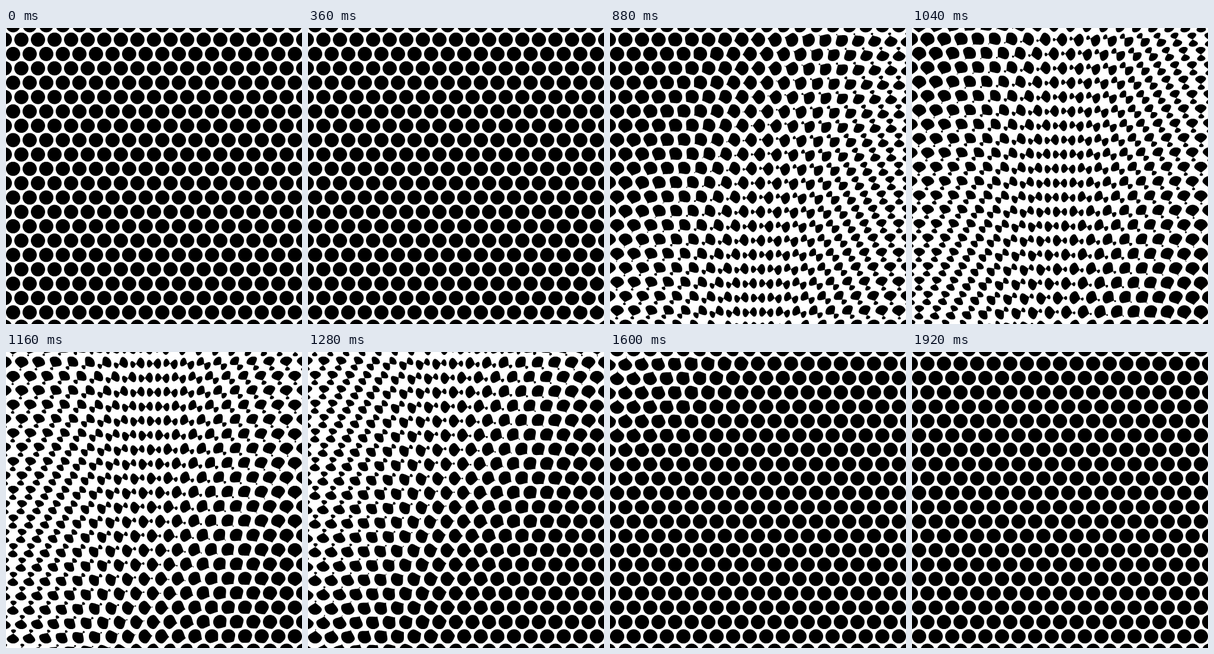
These frames come from a looping animation (500x500 px, 1.96 s). An HTML page with a canvas:

```html
<!DOCTYPE html>
<html lang="en">
<head>
<meta charset="utf-8">
<title>Twisting dots</title>
<style>
  html, body { margin: 0; width: 100%; height: 100%; overflow: hidden; background: #fff; }
  canvas { display: block; width: 500px; height: 500px; }
</style>
</head>
<body>
<canvas id="stage" width="500" height="500"></canvas>
<script>
const SIZE = 500, MID = SIZE / 2;
const LOOP = 1960, STEP = 40;
const GAP = 28, ROW = GAP * Math.sqrt(3) / 2;
const RADIUS = 12, POINTS = 72;
const MID_TIME = 1040, SPEED = 1.44;  // diagonal wave, px per ms
const TURN = 590;                     // ms for one slice to make a half turn
const LAG = 24;                       // ms between slices 1 px apart

const ctx = document.getElementById('stage').getContext('2d');

const dots = [];
for (let j = -11; j <= 10; j++) {
  for (let i = -10; i <= 10; i++) {
    const x = MID + GAP * i + (j % 2 ? GAP / 2 : 0);
    const y = MID + ROW * (j + 0.5);
    dots.push({
      x, y,
      axis: Math.PI * (0.5 + x / SIZE),
      turnAt: MID_TIME - (x + y - SIZE) / SPEED
    });
  }
}

// Each slice across the axis turns edge-on and back, one after the other.
function sliceWidth(along, elapsed) {
  const progress = 0.5 + (elapsed + along * LAG) / TURN;
  return Math.cos(Math.PI * Math.min(1, Math.max(0, progress)));
}

function drawDot(dot, time) {
  const cos = Math.cos(dot.axis), sin = Math.sin(dot.axis);
  ctx.beginPath();
  for (let k = 0; k < POINTS; k++) {
    const angle = 2 * Math.PI * k / POINTS;
    const along = RADIUS * Math.cos(angle);
    const across = RADIUS * Math.sin(angle) * sliceWidth(along, time - dot.turnAt);
    ctx.lineTo(dot.x + along * cos - across * sin, dot.y + along * sin + across * cos);
  }
  ctx.fill();
}

function draw(time) {
  ctx.fillStyle = '#fff';
  ctx.fillRect(0, 0, SIZE, SIZE);
  ctx.fillStyle = '#000';
  for (const dot of dots) drawDot(dot, time);
}

const start = performance.now();
function tick() {
  const time = (performance.now() - start) % LOOP;
  draw(Math.floor(time / STEP) * STEP);
  requestAnimationFrame(tick);
}
tick();
</script>
</body>
</html>
```
